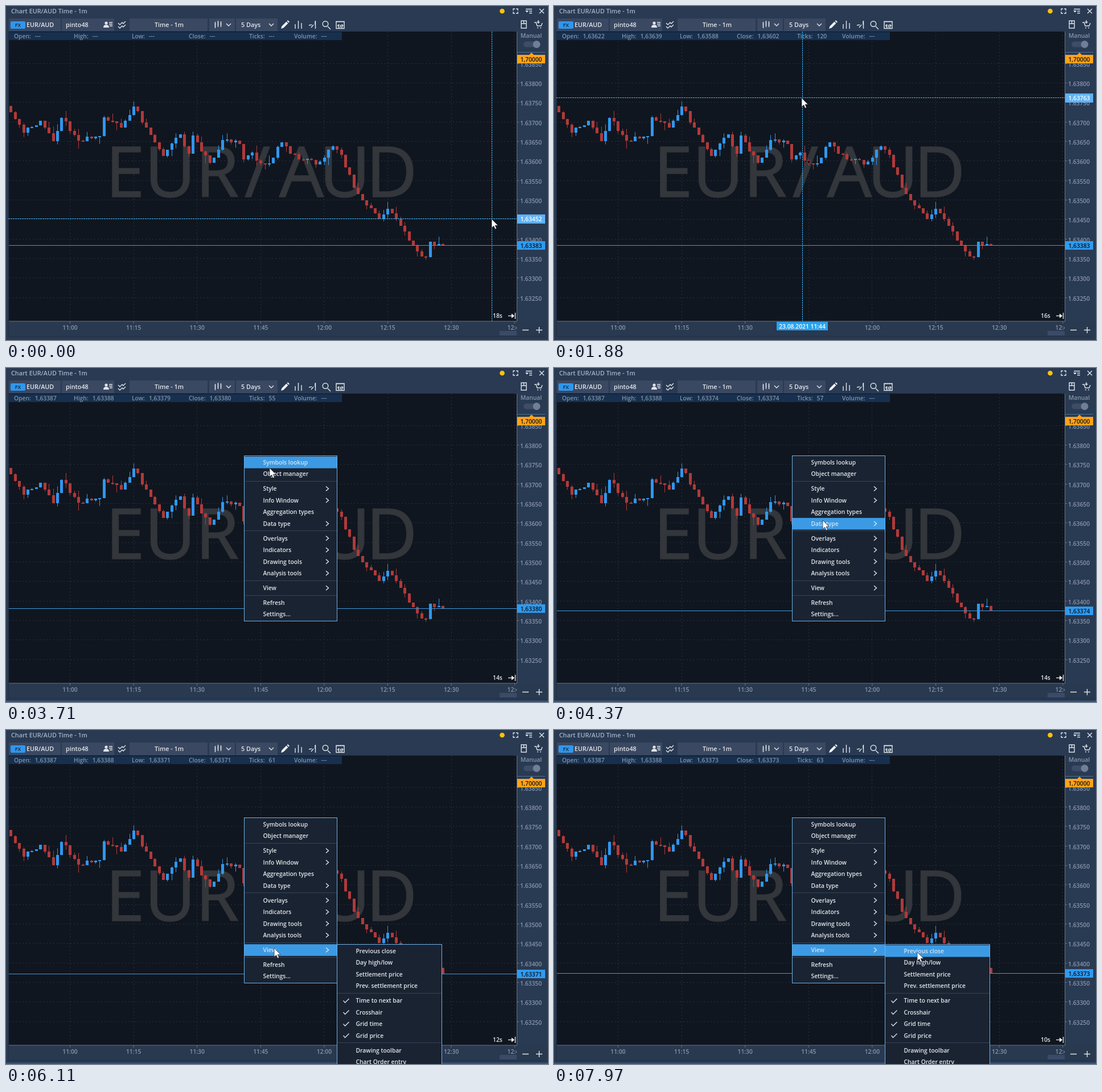
Write an HTML page that moves like this. It is 952 px wide and 588 px high and loops after 8000 ms.

```html
<!DOCTYPE html>
<html lang="en">
<head>
<meta charset="utf-8">
<title>Chart</title>
<style>
html, body { margin: 0; width: 100%; height: 100%; overflow: hidden; background: #29394f; }
svg { display: block; width: 952px; height: 588px; }
text { font: 600 10.3px "Open Sans", "Noto Sans", sans-serif; fill: #e3e7ec; white-space: pre; }
.axis { fill: #8996a9; }
.info { fill: #8093aa; }
.head { font-size: 10.8px; }
.mark { font-size: 123px; font-weight: 400; fill: #33363b; stroke: #33363b; stroke-width: 1.6; }
.icon { fill: none; stroke: #dfe4ea; stroke-width: 1.4; }
.grid { stroke: #29313b; stroke-dasharray: 2 4; }
.cross { stroke: #38b6f6; stroke-dasharray: 3 1; }
.mid { text-anchor: middle; }
</style>
</head>
<body>
<svg id="stage" viewBox="0 0 952 588"></svg>
<script>
const LOOP = 8000, STEP = 7.44, X0 = 8.7, LAST = 102;
const BLUE = '#2f97ee', RED = '#b03a3a', BG = '#10161f', HOVER = '#3c9ae4';
const stage = document.getElementById('stage');

function set(node, attrs) {
  for (const k in attrs) node.setAttribute(k, attrs[k]);
}
function el(tag, attrs, parent = stage) {
  const node = document.createElementNS('http://www.w3.org/2000/svg', tag);
  set(node, attrs);
  return parent.appendChild(node);
}
const rect = (x, y, width, height, fill, parent) => el('rect', { x, y, width, height, fill }, parent);
const line = (x1, y1, x2, y2, attrs, parent) => el('line', { x1, y1, x2, y2, ...attrs }, parent);
const icon = (d, attrs, parent) => el('path', { d, class: 'icon', ...attrs }, parent);
// y is the middle of the text line
function label(str, x, y, cls = '', parent = stage) {
  const node = el('text', { x, y: y + 3.8, class: cls }, parent);
  node.textContent = str;
  return node;
}
const show = (node, on) => { node.style.display = on ? '' : 'none'; };
const move = (node, x, y) => set(node, { transform: `translate(${x} ${y})` });
function put(node, str) { if (node.textContent !== str) node.textContent = str; }

// linear path through key points [when, ...values]
function along(keys, t) {
  const k = Math.max(1, keys.findIndex(p => p[0] >= t));
  const a = keys[k - 1], b = keys[k], u = (t - a[0]) / (b[0] - a[0]);
  return a.slice(1).map((v, i) => v + (b[i + 1] - v) * u);
}
let seed = 11;
const rnd = () => (seed = (seed * 16807) % 2147483647) / 2147483647;

const priceY = p => 101.3 + (63850 - p) * 0.6866;
const yPrice = y => Math.round(63850 - (y - 101.3) / 0.6866);
const fmt = p => '1,' + p;
const gridX = k => 112.5 + k * 15 * STEP;
const gridPrice = k => 63850 - 50 * k;
function clock(i) {
  const m = 46 + i;
  return (10 + Math.floor(m / 60)) + ':' + String(m % 60).padStart(2, '0');
}

// ---- chart ----
rect(4, 45, 893, 510, BG);
for (let k = 0; k < 8; k++) {
  const x = Math.floor(gridX(k)) + 0.5;
  line(x, 45, x, 555, { class: 'grid' });
}
for (let k = 0; k < 13; k++) {
  const y = Math.floor(priceY(gridPrice(k))) + 0.5;
  line(5, y, 897, y, { class: 'grid' });
}
label('EUR', 175, 332.5, 'mark');
label('/', 419, 332.5, 'mark');
set(label('AUD', 480, 332.5, 'mark'), { 'letter-spacing': -7.5 });

// turning points [bar, level]; the bars between wander around the straight line
const swings = [[0, 176], [4, 223], [8, 202], [11, 238], [13, 197], [17, 237], [22, 229], [23, 196], [27, 214],
  [30, 177], [37, 264], [41, 226], [43, 260], [44, 228], [48, 276], [51, 236], [55, 243], [56, 270], [58, 258],
  [59, 271.5], [62, 277], [65, 240], [67, 260], [73, 279], [77, 247], [79, 262], [82, 320], [88, 375], [90, 357],
  [96, 421], [97, 431.5], [99, 442], [100, 415], [102, 419]];
function level(i) {
  const wander = (rnd() - 0.5) * 9;
  return along(swings, i)[0] + (swings.some(s => s[0] === i) ? 0 : wander);
}

const bars = [];
let open = level(0);
for (let i = 0; i <= LAST; i++) {
  const live = i === LAST;
  if (live) open = priceY(63387);
  const close = live ? priceY(63383) : level(i + 1);
  const top = Math.min(open, close), bottom = Math.max(open, close);
  const high = top - rnd() ** 3 * 14, low = bottom + (live ? 0 : rnd() ** 3 * 14);
  const color = close > open ? RED : BLUE;
  const x = Math.round(X0 + STEP * i - 0.5);
  line(x + 0.5, high, x + 0.5, low, { stroke: color });
  const height = Math.max(2, Math.round(bottom) - Math.round(top));
  const body = rect(x - 2, Math.round(top), 5, height, color);
  bars.push({ body, color, open, close, high, low, ticks: 50 + Math.floor(rnd() * 190) });
  open = close;
}

const priceLine = line(5, 0, 897, 0, { stroke: '#3a9ade' });
rect(5, 46, 585, 14, '#17304f');
const info = Object.entries({ Open: 14, High: 119, Low: 221, Close: 321, Ticks: 427, Volume: 506 }).map(([name, x]) => {
  const value = el('tspan', { dx: 7 }, label(name + ':', x, 53, 'info'));
  value.textContent = '---';
  return value;
});
const timer = label('', 855, 545);
icon('M882 545.5h8', { 'stroke-width': 2 });
el('path', { d: 'M888 541.5l5 4-5 4z', fill: '#fff' });
icon('M894.5 540v11');

// ---- axes ----
rect(897, 45, 55, 543, '#293a53');
rect(0, 555, 952, 33, '#29394f');
line(897.5, 45, 897.5, 555, { stroke: '#66758b' });
line(4, 555, 898, 555, { stroke: '#66758b' });
line(4.5, 45, 4.5, 581, { stroke: '#202e42' });
line(4, 581.5, 947, 581.5, { stroke: '#223047' });
for (let k = 0; k < 13; k++) {
  const y = Math.floor(priceY(gridPrice(k))) + 0.5;
  line(897, y, 901, y, { stroke: '#66758b' });
  label('1.' + gridPrice(k), 903, y + 1.5, 'axis');
}
rect(4, 555, 893, 30, '#000', el('clipPath', { id: 'axisClip' }));
const times = el('g', { 'clip-path': 'url(#axisClip)' });
for (let k = 0; k < 8; k++) {
  line(gridX(k), 555, gridX(k), 559, { stroke: '#66758b' }, times);
  label(clock(14 + 15 * k), gridX(k), 566, 'axis mid', times);
}
rect(867, 572, 30, 8, '#3b4a66');
icon('M907 570.5h11M931 570.5h11M936.5 565v11', { 'stroke-width': 2 });

label('Manual', 922.5, 52, 'axis mid');
el('rect', { x: 909, y: 62.5, width: 29, height: 10, rx: 5, fill: '#3d4c67' });
el('circle', { cx: 932, cy: 67.5, r: 6.5, fill: '#707e96' });
line(898, 81.5, 947, 81.5, { stroke: '#4a7299' });
el('path', { d: 'M898 86h21l4-4 4 4h20v15h-49z', fill: '#ffa31a' });
label('1,70000', 922.5, 94, 'mid').style.fill = '#141414';

function tag(x, y, w, h, textX, fill, ink, parent) {
  const g = el('g', {}, parent);
  rect(x, y, w, h, fill, g);
  const text = label('', textX, y + h / 2 + 0.6, 'mid', g);
  text.style.fill = ink;
  return { g, text };
}
const priceTag = tag(898, -8, 49, 15, 922.5, '#2f9bf0', '#0c1420');

// ---- window header ----
rect(0, 0, 952, 45, '#293a52');
label('Chart EUR/AUD Time - 1m', 9, 9, 'head').style.fill = '#a5b3c5';
el('circle', { cx: 871.5, cy: 9, r: 4.3, fill: '#ffc20a' });
icon('M891 8v-3h3M896 5h3v3M899 10v3h-3M894 13h-3v-3M913 5.5h11M919 9h5M919 12.5h5M937 5l8 8M945 5l-8 8');
el('path', { d: 'M912 8h6l-3 3.5z', fill: '#dfe4ea' });
for (const [x, w] of [[5, 91], [98, 92], [217, 137], [357, 45], [404, 73]]) rect(x, 22, w, 22, '#3a4862');
el('rect', { x: 8, y: 27, width: 26, height: 13, rx: 2, fill: '#2f97ee' });
const badge = label('FX', 21, 33, 'mid');
badge.style.fontSize = '9px';
badge.style.fill = '#12263d';
label('EUR/AUD', 36, 33.5, 'head');
label('pinto48', 105, 33.5, 'head');
label('Time - 1m', 286.5, 33.5, 'head mid');
label('5 Days', 413, 33.5, 'head');
el('circle', { cx: 176, cy: 30, r: 2.6, fill: '#dfe4ea' });
el('path', { d: 'M171 38q0-5 5-5t5 5z', fill: '#dfe4ea' });
icon('M181 29h6M181 32h6M182 35h5');
icon('M197 30l3 3 4-4 2 2 4-4M197 36l3 3 4-4 2 2 4-4');
icon('M367.5 28v11M372.5 26v11M377.5 27v10');
icon('M367.5 30v6M372.5 28v6M377.5 29v5', { 'stroke-width': 3 });
icon('M387 31l4 4 4-4M462 31l4 4 4-4');
el('path', { d: 'M483 40l1.5-4.5 8-8 3 3-8 8zM493.5 26.5l1.5-1.5 3 3-1.5 1.5z', fill: '#eef1f5' });
icon('M508 32v8M513.5 26v14M519 30v10', { 'stroke-width': 3.4 });
icon('M532 34l5-1M536 38l4-5M543.5 26v14');
icon('M543 27v6', { 'stroke-width': 5 });
icon('M565 36l5 5', { 'stroke-width': 2.2 });
el('circle', { cx: 561, cy: 31.5, r: 4.8, class: 'icon' });
icon('M580 27.5h14v12h-14zM584.5 32v7M590 32v7');
icon('M579.5 27.5h15', { 'stroke-width': 4 });
icon('M583 33v3M587.5 33v5M591.5 33v3', { 'stroke-width': 2 });
icon('M905 26h9v13h-9zM905 31h9M909.5 26v5');
icon('M928 29h3l2 6h7l2-5M935 25v6M932.5 28.5h5');
icon('M933 38.5h2M938 38.5h2', { 'stroke-width': 2.5 });

// ---- crosshair ----
const cross = el('g', {});
const crossV = line(0.5, 45, 0.5, 555, { class: 'cross' }, cross);
const crossH = line(4, 0, 897, 0, { class: 'cross' }, cross);
const crossTag = tag(898, -8, 49, 16, 922.5, '#5fb2f7', '#fff', cross);
const dateTag = tag(-45, 556, 90, 15, 0, '#2aa3ee', '#fff', cross);
const active = line(0, 586.5, 952, 586.5, { stroke: '#3a78b4' });

// ---- menus: groups of rows; '>' opens a submenu, '*' is ticked ----
function menu(x, y, w, h, groups) {
  const g = el('g', {}), centers = [], texts = [];
  el('rect', { x: x + 0.5, y: y + 0.5, width: w - 1, height: h - 1, fill: '#1a2331', stroke: '#6db1ea' }, g);
  const bar = rect(x + 1, 0, w - 2, 20.5, HOVER, g);
  let c = y + 12;
  groups.forEach((rows, n) => {
    if (n) {
      const s = Math.floor(c - 13) + 0.5;
      line(x + 1, s, x + w - 1, s, { stroke: '#364256' }, g);
    }
    for (const row of rows.split(', ')) {
      texts.push(label(row.replace(/[>*]/, ''), x + 33.5, c, '', g));
      if (row.includes('>')) icon(`M${x + 144} ${c - 4}l4.5 4-4.5 4`, {}, g);
      if (row.includes('*')) icon(`M${x + 11.5} ${c}l3 3.5 7-7`, {}, g);
      centers.push(c);
      c += 20.5;
    }
    c += 5.4;
  });
  return { g, bar, centers, texts };
}
const main = menu(418, 154, 164, 292, [
  'Symbols lookup, Object manager', 'Style>, Info Window>, Aggregation types, Data type>',
  'Overlays>, Indicators>, Drawing tools>, Analysis tools>', 'View>', 'Refresh, Settings...']);
const sub = menu(581, 377, 185, 240, [
  'Previous close, Day high/low, Settlement price, Prev. settlement price',
  '*Time to next bar, *Crosshair, *Grid time, *Grid price', 'Drawing toolbar, Chart Order entry']);
const VIEW = 10;

function highlight(m, row) {
  show(m.bar, row >= 0);
  if (row >= 0) set(m.bar, { y: m.centers[row] - 10 });
  m.texts.forEach((t, i) => { t.style.fill = i === row ? '#d5e4f2' : ''; });
}
const rowAt = (m, y) => m.centers.findIndex(c => Math.abs(y - c) <= 10.3);

const pointer = el('path', {
  d: 'M0 0v15.5l3.6-3.3 2.5 5.6 2.4-1.1-2.4-5.4h5z', fill: '#fff', stroke: '#1b1f26', 'stroke-width': 0.7
});

// ---- motion ----
const path = [[0, 853, 375], [870, 853, 375], [1230, 720, 257], [1880, 436, 162], [2070, 419, 155],
  [3310, 419, 155], [3710, 463, 174], [4370, 472, 266], [5100, 469, 386], [6110, 468, 384],
  [6800, 652, 388], [7700, 656, 388], [LOOP, 637, 391]];
const at = t => along(path, Math.max(0, Math.min(LOOP, t)));
// quotes [from, price, ticks]
const quotes = [[0, 63383, 53], [2690, 63382, 54], [3310, 63380, 55], [4130, 63374, 57],
  [5900, 63371, 61], [7300, 63373, 63]];
const barAt = x => Math.round((x - X0) / STEP + 0.2);
const fade = (t, from) => Math.min(1, (t - from + 40) / 170);

let hollow;
function outline(bar) {
  if (bar === hollow) return;
  if (hollow) set(hollow.body, { fill: hollow.color, stroke: 'none' });
  if (bar) set(bar.body, { fill: BG, stroke: bar.color, 'stroke-width': 0.8 });
  hollow = bar;
}

function drawCross(x, y, i) {
  const cx = Math.round(x), cy = Math.round(y) - 0.5;
  move(crossV, cx, 0);
  move(crossH, 0, cy);
  move(crossTag.g, 0, cy + 0.5);
  put(crossTag.text, fmt(yPrice(y - 0.7)));
  show(dateTag.g, !!bars[i]);
  move(dateTag.g, cx, 0);
  put(dateTag.text, '23.08.2021 ' + clock(i));
}

function render(t) {
  const [x, y] = at(t), [px, py] = at(t + 12);
  move(pointer, Math.round(px), Math.round(py));
  put(timer, 18 - Math.floor((t + 500) / 1000) + 's');

  const past = quotes.filter(q => q[0] <= t);
  const [, price, ticks] = past[past.length - 1];
  const low = Math.min(63379, price);
  const liveY = Math.round(priceY(price));
  move(priceLine, 0, liveY - 0.5);
  move(priceTag.g, 0, liveY);
  put(priceTag.text, fmt(price));
  set(bars[LAST].body, { height: Math.max(2, liveY - 419) });

  const menuOpen = t >= 2230, subOpen = t >= 5250;
  const i = barAt(x), bar = bars[i];
  let values = Array(5).fill('---');
  if (menuOpen) {
    values = [...[63387, 63388, low, price].map(fmt), ticks];
  } else if (bar) {
    values = [...[bar.open, bar.high, bar.low, bar.close].map(v => fmt(yPrice(v))), bar.ticks];
  }
  values.forEach((v, k) => put(info[k], String(v)));

  show(cross, !menuOpen);
  show(active, menuOpen);
  if (!menuOpen) drawCross(x, y, i);
  outline(menuOpen ? undefined : bars[barAt(at(t - 30)[0])]);

  show(main.g, menuOpen);
  show(sub.g, subOpen);
  main.g.style.opacity = fade(t, 2230);
  sub.g.style.opacity = fade(t, 5250);
  highlight(main, subOpen ? VIEW : px > 420 ? rowAt(main, py) : -1);
  highlight(sub, subOpen && px > 582 ? rowAt(sub, py) : -1);
}

const start = performance.now();
function tick() {
  render((performance.now() - start) % LOOP);
  requestAnimationFrame(tick);
}
tick();
</script>
</body>
</html>
```
